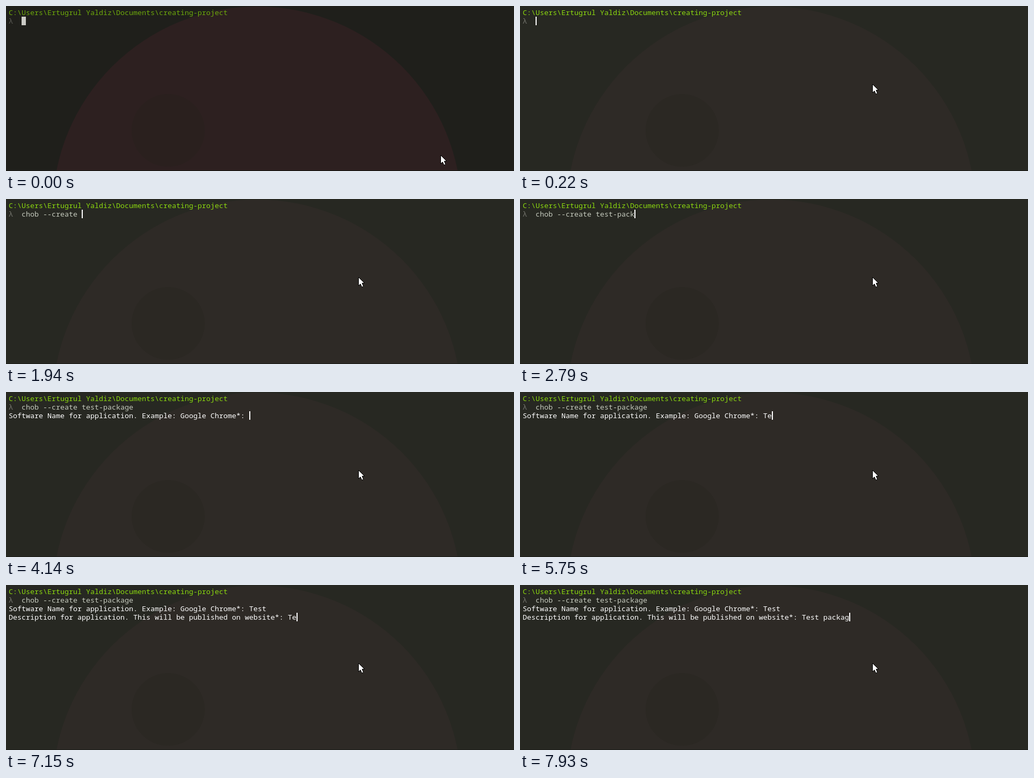
An HTML page with a canvas for the animation above (8 s loop, 946 px wide and 309 px high).

```html
<!DOCTYPE html>
<html lang="en">
<head>
<meta charset="utf-8">
<title>Terminal session</title>
<style>
  html, body { margin: 0; width: 100%; height: 100%; overflow: hidden; background: #272822; }
  canvas { position: absolute; left: 0; top: 0; display: block; }
  #text {
    position: absolute; left: 5px; top: 4px;
    font: 13.3333px/16px "Noto Sans Mono", "DejaVu Sans Mono", monospace;
    font-variant-ligatures: none; color: #fff;
  }
  #text div { height: 16px; white-space: pre; }
  #path { color: #8bd80f; }
  #lambda { color: #75756e; }
  #command { color: #c5cabd; }
  .dim #path { color: #6ca80b; }
  .dim #lambda { color: #5a5a54; }
</style>
</head>
<body>
<canvas id="back" width="946" height="309"></canvas>
<div id="text">
  <div id="path">C:\Users\Ertugrul Yaldiz\Documents\creating-project</div>
  <div><span id="lambda">λ  </span><span id="command"></span></div>
  <div id="name"></div>
  <div id="about"></div>
</div>
<canvas id="front" width="946" height="309"></canvas>
<script>
const LOOP = 8000, CELL = 8, ROW = 16, LEFT = 5, TOP = 4;
const FOCUS = 220, ENTER_CMD = 3100, ASK_NAME = 4140, ASK_ABOUT = 6220;

const COMMAND = 'chob --create test-package';
const NAME_PROMPT = 'Software Name for application. Example: Google Chrome*: ';
const ABOUT_PROMPT = 'Description for application. This will be published on website*: ';

// Key bursts: [first key, last key, number of keys]
const commandKeys = bursts([
  [620, 620, 1], [770, 770, 1], [920, 1150, 4], [1300, 1380, 2], [1550, 1550, 1],
  [1620, 1620, 2], [1790, 2090, 5], [2260, 2410, 3], [2560, 3020, 7]
]);
const nameKeys = [5600, 5750, 5980, 6150];
const aboutKeys = bursts([[6920, 6920, 1], [7150, 7150, 1], [7320, 7930, 9]]);
const caretOff = [[3570, 4140], [4670, 5200], [6770, 6920]];
const pointerStops = [[0, 809, 279], [70, 757, 234], [150, 690, 175], [220, 656, 146]];

const $ = id => document.getElementById(id);
const back = $('back').getContext('2d');
const front = $('front').getContext('2d');
const arrow = new Path2D('M.5 .5V16.5L4 13L6.5 18.5H8.5L9.3 17L7.2 11.5H11.5Z');

function bursts(list) {
  return list.flatMap(([a, b, n]) =>
    Array.from({ length: n }, (_, i) => Math.round(a + (n > 1 ? (b - a) * i / (n - 1) : 0))));
}

const within = (t, [a, b]) => t >= a && t < b;
const typed = (text, keys, t) => text.slice(0, keys.filter(k => k <= t).length);

function setText(id, value) {
  const el = $(id);
  if (el.textContent !== value) el.textContent = value;
}

function disc(x, y, r, color) {
  back.fillStyle = color;
  back.beginPath();
  back.arc(x, y, r, 0, Math.PI * 2);
  back.fill();
}

function drawBack(focused) {
  back.fillStyle = focused ? '#272822' : '#1f1f1b';
  back.fillRect(0, 0, 946, 309);
  disc(467.5, 381.7, 380.7, focused ? '#2e2a26' : '#2d2020');
  disc(302, 233, 68, focused ? '#2b2823' : '#2a201e');
  back.fillStyle = focused ? '#1b1c18' : '#161613';
  back.fillRect(0, 308, 946, 1);
}

function drawCaret(col, row, focused) {
  front.fillStyle = focused ? '#fff' : '#cbcbc6';
  front.fillRect(LEFT + col * CELL, TOP + row * ROW, focused ? 2 : CELL, ROW);
}

function drawPointer(t) {
  const [, x, y] = pointerStops.filter(s => s[0] <= t).pop();
  front.save();
  front.translate(x, y);
  front.fillStyle = '#fff';
  front.strokeStyle = '#000';
  front.fill(arrow);
  front.stroke(arrow);
  front.restore();
}

function render(t) {
  const focused = t >= FOCUS;
  const command = typed(COMMAND, commandKeys, t);
  const answer = within(t, [5200, 5520]) ? 'T' : typed('Test', nameKeys, t);
  const name = t >= ASK_NAME ? NAME_PROMPT + answer : '';
  const about = t >= ASK_ABOUT ? ABOUT_PROMPT + typed('Test packag', aboutKeys, t) : '';

  $('text').className = focused ? '' : 'dim';
  setText('command', command);
  setText('name', name);
  setText('about', about);

  drawBack(focused);
  front.clearRect(0, 0, 946, 309);
  if (!caretOff.some(span => within(t, span))) {
    if (t >= ASK_ABOUT) drawCaret(about.length, 3, true);
    else if (t >= ENTER_CMD) drawCaret(name.length, 2, true);
    else drawCaret(3 + command.length, 1, focused);
  }
  drawPointer(t);
}

const start = performance.now();
function tick() {
  render((performance.now() - start) % LOOP);
  requestAnimationFrame(tick);
}
tick();
</script>
</body>
</html>
```
